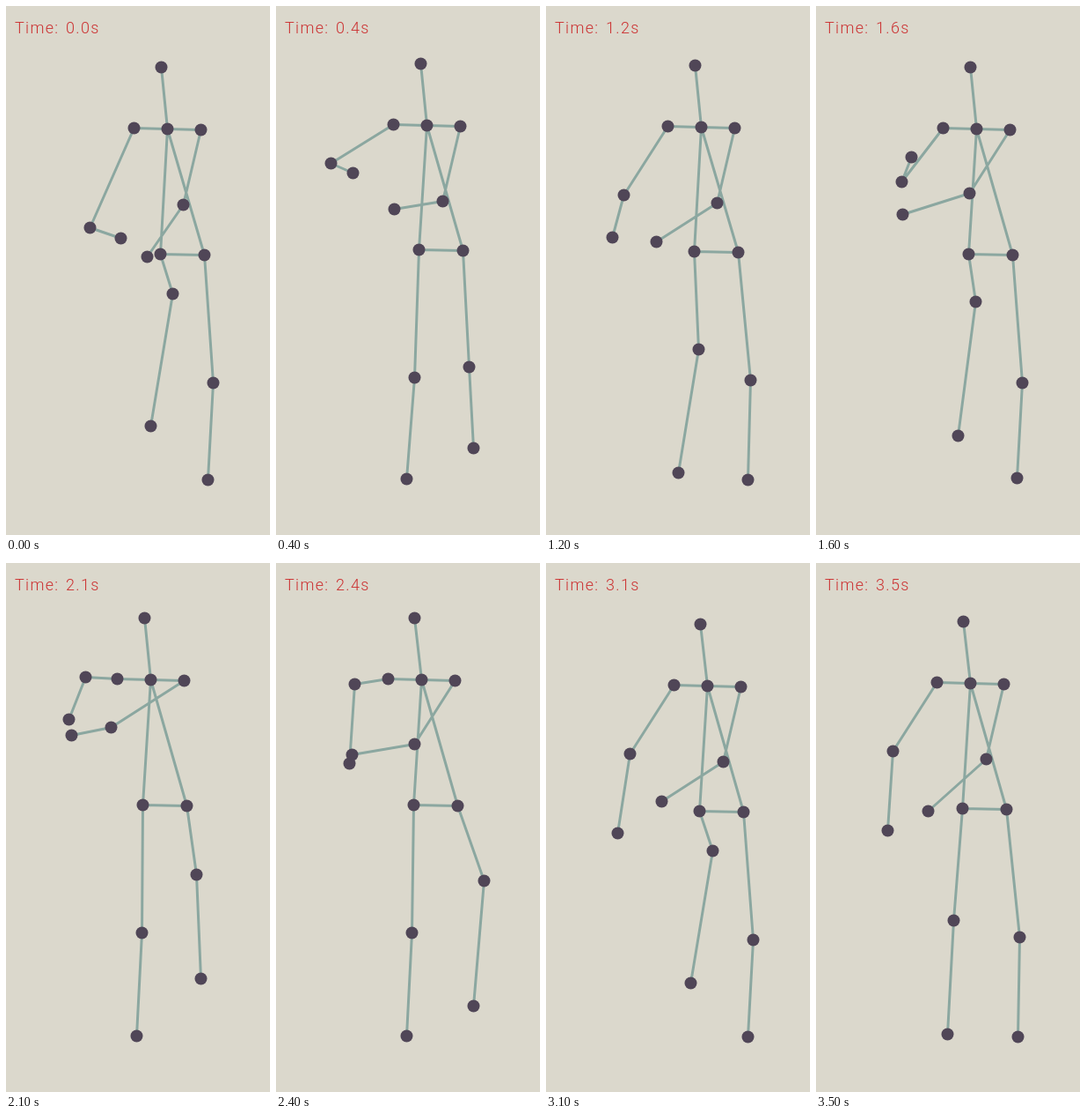
Recreate the animation shown at these times as an HTML page with a canvas. Size 300 px wide and 600 px high, loop 3600 ms.

```html
<!DOCTYPE html>
<html lang="en">
<head>
<meta charset="utf-8">
<title>Walking figure</title>
<style>
  html, body { margin: 0; width: 100%; height: 100%; overflow: hidden; background: #dbd8cc; }
  canvas { display: block; }
</style>
</head>
<body>
<canvas id="stage" width="300" height="600"></canvas>
<script>
const ctx = document.getElementById('stage').getContext('2d');
const LOOP = 3600, STEP = 100;

const bones = [
  'head neck', 'neck shoulderL', 'neck shoulderR',
  'shoulderL elbowL', 'elbowL wristL', 'shoulderR elbowR', 'elbowR wristR',
  'neck hipL', 'neck hipR', 'hipL hipR',
  'hipL kneeL', 'kneeL ankleL', 'hipR kneeR', 'kneeR ankleR'
].map(pair => pair.split(' '));

// Steps are [middle, half duration] in seconds; lift is in pixels.
const legL = {
  steps: [[0, 0.4], [1.5, 0.5], [3.084, 0.576]],
  kneeLift: 100, ankleLift: 60, heelLead: 0, sharp: 2,
  ground: [148, 536], reach: 16, bow: 3, forward: 18, swing: -7
};
const legR = {
  steps: [[0.72, 0.44], [2.23, 0.58]],
  kneeLift: 75, ankleLift: 66, heelLead: 0.11, sharp: 1,
  ground: [228.5, 536.5], reach: -8, bow: 8, forward: 2, swing: 12
};

const add = ([x, y], dx, dy) => [x + dx, y + dy];

// Angle through a movement, -PI/2 at its start and PI/2 at its end.
function angle(t, mid, half) {
  const u = Math.max(-1, Math.min(1, (t - mid) / half));
  return u * Math.PI / 2;
}
const pulse = (t, mid, half) => Math.cos(angle(t, mid, half)) ** 2;

const sum = (steps, f) => steps.reduce((total, step) => total + f(step), 0);
const lift = (leg, t) => sum(leg.steps, s => pulse(t, ...s));

function poseLeg(leg, hip, t) {
  const up = lift(leg, t);
  const raise = lift(leg, t + leg.heelLead) ** leg.sharp;
  const ankle = add(leg.ground, leg.reach * raise, -leg.ankleLift * raise);
  const sway = sum(leg.steps, s => Math.sin(2 * angle(t, ...s)));
  const knee = [
    0.4 * hip[0] + 0.6 * ankle[0] + leg.bow + leg.forward * up + leg.swing * sway,
    hip[1] + 145 - leg.kneeLift * up
  ];
  return [knee, ankle];
}

function poseArmL(shoulder, t) {
  const out = pulse(t, 0.42, 0.4), high = pulse(t, 2.2, 0.85);
  const elbow = add(shoulder,
    -50 - 21 * out + 14 * high,
    78 + 35 * pulse(t, 0, 0.35) - 34 * out - 83 * high);
  const flex = pulse(t, 0.2, 0.5) + pulse(t, 1.65, 0.75);
  const wave = Math.cos(2 * Math.PI * (t - 1.6) / 1.1);
  const wrist = add(elbow,
    -4 + 54 * pulse(t, 0.05, 0.55) + 15 * wave,
    90 - 120 * flex);
  return [elbow, wrist];
}

function poseArmR(shoulder, t) {
  const high = pulse(t, 2, 0.7);
  const elbow = add(shoulder, -20 - 67 * high, 85 - 33 * high);
  const bend = pulse(t, 2.15, 1.5);
  const wrist = add(elbow,
    -65 + 24 * pulse(t, 0, 0.7) - 16 * bend + 36 * pulse(t, 2.1, 0.45),
    60 - 52 * (pulse(t, 0.45, 0.5) + bend));
  return [elbow, wrist];
}

function pose(t) {
  // The body leans over the standing leg.
  const lean = lift(legL, t) - lift(legR, t);
  const neck = [173 + 10 * lean, 135.3 + 4 * lean];
  const pelvis = [189 + 10.5 * lean, 277.6 + 4 * lean];
  const head = add(neck, -7.5, -70);
  const shoulderL = add(neck, -38, -1), shoulderR = add(neck, 38, 1);
  const hipL = add(pelvis, -25, -0.5), hipR = add(pelvis, 25, 0.5);
  const [elbowL, wristL] = poseArmL(shoulderL, t);
  const [elbowR, wristR] = poseArmR(shoulderR, t);
  const [kneeL, ankleL] = poseLeg(legL, hipL, t);
  const [kneeR, ankleR] = poseLeg(legR, hipR, t);
  return {
    head, neck, shoulderL, shoulderR, elbowL, wristL, elbowR, wristR,
    hipL, hipR, kneeL, ankleL, kneeR, ankleR
  };
}

function draw(t) {
  const points = pose(t);
  for (const name in points) points[name] = points[name].map(v => Math.round(v) + 0.5);

  ctx.fillStyle = '#dbd8cc';
  ctx.fillRect(0, 0, 300, 600);

  ctx.strokeStyle = '#8ba7a0';
  ctx.lineWidth = 3;
  ctx.beginPath();
  for (const [from, to] of bones) {
    ctx.moveTo(...points[from]);
    ctx.lineTo(...points[to]);
  }
  ctx.stroke();

  ctx.fillStyle = '#504657';
  for (const [x, y] of Object.values(points)) {
    ctx.beginPath();
    ctx.arc(x, y, 7, 0, 2 * Math.PI);
    ctx.fill();
  }

  ctx.fillStyle = '#cc3232';
  ctx.font = '300 18px Roboto, "DejaVu Sans", sans-serif';
  ctx.letterSpacing = '1.3px';
  ctx.wordSpacing = '2px';
  ctx.fillText(`Time: ${t.toFixed(1)}s`, 10, 30.5);
}

function tick() {
  const step = Math.floor(performance.now() % LOOP / STEP);
  draw(step * STEP / 1000);
  requestAnimationFrame(tick);
}
draw(0);
requestAnimationFrame(tick);
</script>
</body>
</html>
```
